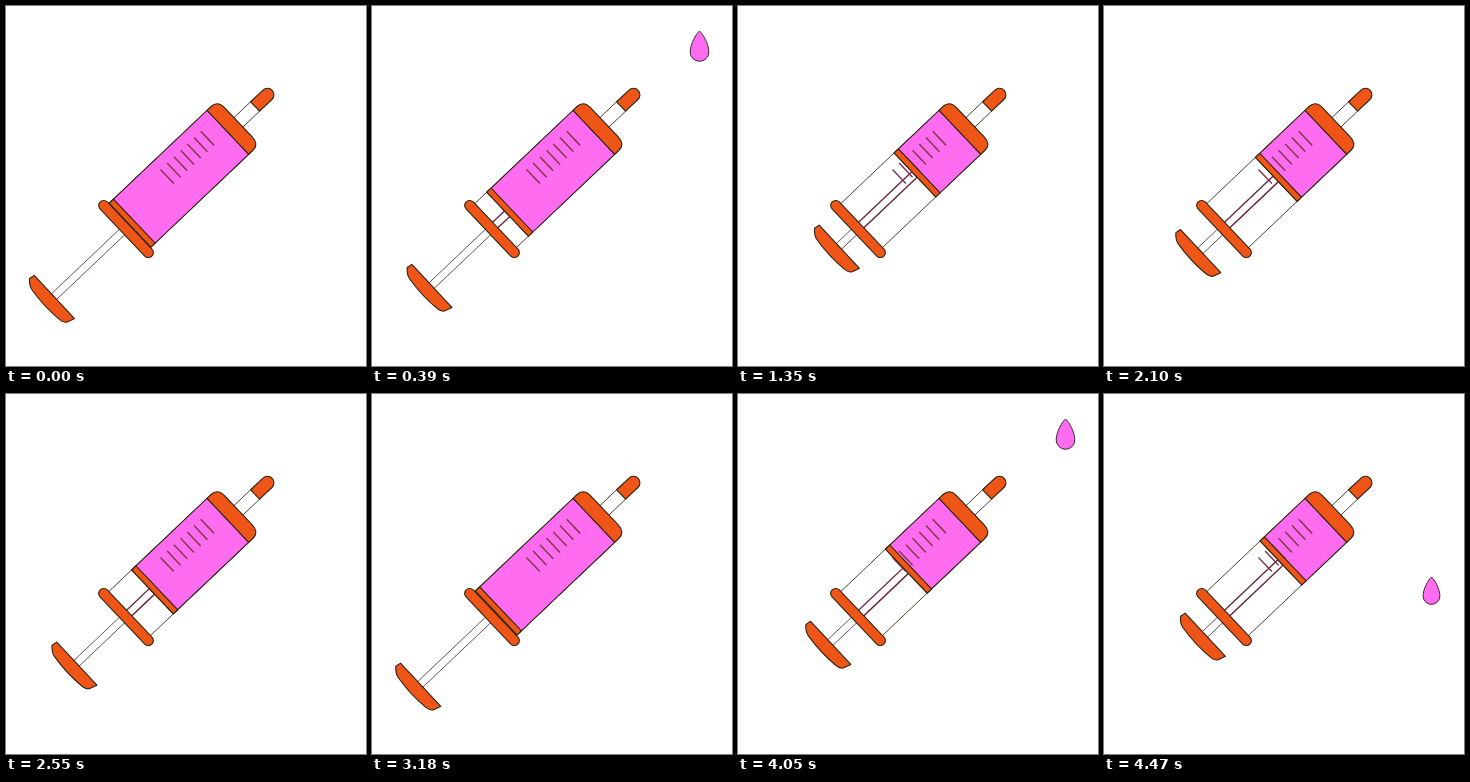
An HTML page for the animation above (4500 ms loop, 360x360 px).

```html
<!DOCTYPE html>
<html lang="en">
<head>
<meta charset="utf-8">
<title>Syringe</title>
<style>
  html, body { margin: 0; width: 100%; height: 100%; overflow: hidden; background: #fff; }
  svg { display: block; width: 100vw; height: 100vh; }
  .line { stroke: #2b2412; stroke-width: 1.1; stroke-linejoin: round; }
  .orange { fill: #f05518; }
  .pink { fill: #ff6cf0; }
  .white { fill: #fff; }
  .thin { stroke-width: .8; }
  .rod { stroke: #4c3448; stroke-width: .8; }
  .inner { stroke: #6b2a44; stroke-width: 1.4; }
  .ticks { fill: none; stroke: #7d3a4c; stroke-width: 1.5; }
  .drop { stroke: #3a2a36; stroke-width: 1; vector-effect: non-scaling-stroke; }
</style>
</head>
<body>
<svg viewBox="0 0 360 360">
  <defs>
    <path id="drop" class="pink drop" d="M0 0C3.5 3 9.3 13 9.3 21A9.3 9.3 0 0 1 -9.3 21C-9.3 13 -3.5 3 0 0Z"/>
  </defs>
  <!-- x runs along the syringe, 0 is the rear flange -->
  <g transform="translate(120 223) rotate(-43.5)">
    <rect class="line thin white" x="152" y="-6.5" width="28" height="13"/>
    <path class="line orange" d="M178 -6.5H195A6.5 6.5 0 0 1 195 6.5H178Z"/>
    <rect class="line thin white" x="3" y="-30.3" width="139" height="60.6"/>
    <rect id="liquid" class="line pink" y="-30.3" height="60.6"/>
    <g id="plunger">
      <rect class="white rod" x="-99" y="-4.3" width="100" height="7.6"/>
      <path class="line orange" d="M-98.5 -29.5L-104 -30.5Q-109 -26 -110 -21Q-113 0 -110.5 20Q-109.5 26 -106.5 27L-99 29.5Z"/>
    </g>
    <rect id="inner" class="white inner" x="0" y="-4.5" height="7.6"/>
    <path id="ticks" class="ticks"/>
    <rect id="seal" class="line orange" y="-30.3" width="6" height="60.6"/>
    <path class="line orange" d="M140.5 -30.3H146Q155 -30.3 155 -20V20Q155 30.3 146 30.3H140.5Z"/>
    <rect class="line orange" x="-5" y="-37.5" width="10" height="75" rx="5"/>
  </g>
  <g id="drops"></g>
</svg>
<script>
const LOOP = 4500, STROKE = 1260, TRAVEL = 73;
const SEAL = 5.5, COLLAR = 140.5;
const HOLD_END = 1860, SECOND = 3124;
const births = [80, 590, SECOND + 80, SECOND + 590];
const GROW = 200, HANG = 400, LIFE = 758, GRAVITY = 0.00124;

const $ = id => document.getElementById(id);
const clamp = x => Math.min(1, Math.max(0, x));
const ease = x => (1 - Math.cos(Math.PI * clamp(x))) / 2;

$('ticks').setAttribute('d',
  Array.from({ length: 7 }, (_, i) => `M${66 + i * 9.25} -19.5V0`).join(''));

const drops = births.map(birth => {
  const el = document.createElementNS('http://www.w3.org/2000/svg', 'use');
  el.setAttribute('href', '#drop');
  $('drops').append(el);
  return { birth, el };
});

function push(t) {
  if (t < HOLD_END) return ease(t / STROKE);
  if (t < SECOND) return 1 - ease((t - HOLD_END) / STROKE);
  return ease((t - SECOND) / STROKE);
}

function drawDrop({ birth, el }, t) {
  const age = t - birth;
  const alive = age > 0 && age < LIFE;
  el.style.display = alive ? '' : 'none';
  if (!alive) return;
  const fall = GRAVITY * Math.max(0, age - HANG) ** 2;
  const scale = clamp(age / GROW) - 0.1 * clamp((age - 660) / 100);
  el.setAttribute('transform', `translate(327.5 ${25 + fall}) scale(${scale})`);
}

function draw(t) {
  const x = TRAVEL * push(t);
  $('plunger').setAttribute('transform', `translate(${x})`);
  $('inner').setAttribute('width', SEAL + x);
  $('seal').setAttribute('x', SEAL + x);
  $('liquid').setAttribute('x', SEAL + x);
  $('liquid').setAttribute('width', COLLAR - SEAL - x);
  drops.forEach(d => drawDrop(d, t));
}

const start = performance.now();
function tick() {
  draw((performance.now() - start) % LOOP);
  requestAnimationFrame(tick);
}
tick();
</script>
</body>
</html>
```
